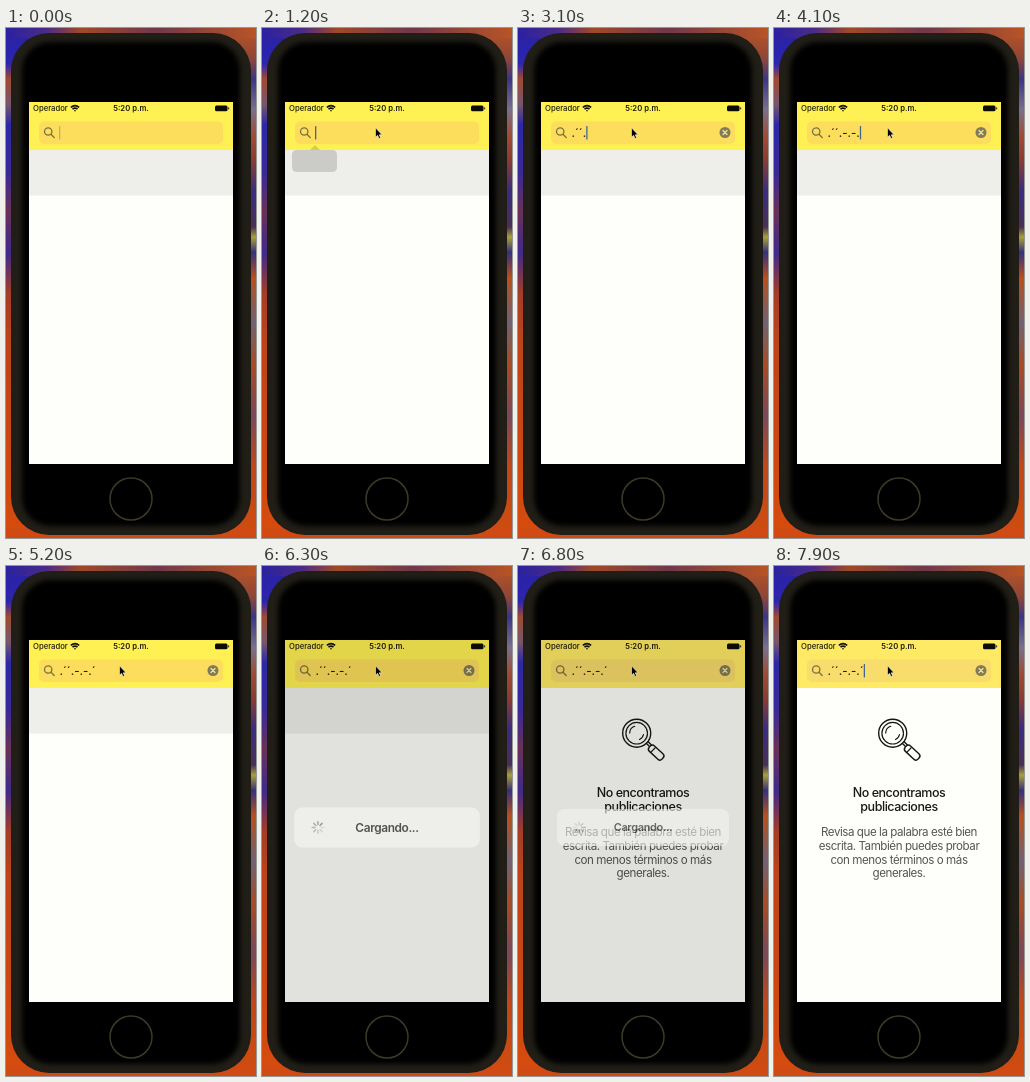
Recreate the animation shown at these times as an HTML page. Size 250 px wide and 510 px high, loop 8000 ms.

```html
<!DOCTYPE html>
<html lang="es">
<head>
<meta charset="utf-8">
<style>
  html, body { margin: 0; width: 100%; height: 100%; overflow: hidden; background: #000; }
  svg { display: block; width: 250px; height: 510px; font-family: Inter, Roboto, sans-serif; }
  .status { font-size: 7.7px; font-weight: 500; fill: #1e1d0c; }
  .title { font-size: 12.5px; font-weight: 500; letter-spacing: -.45px; fill: #181818; }
  .body { font-size: 11.6px; letter-spacing: -.45px; fill: #555; }
  .mid { text-anchor: middle; }
  .line { fill: none; stroke: #151515; stroke-width: 1.4; stroke-linecap: round; stroke-linejoin: round; }
</style>
</head>
<body>
<svg viewBox="0 0 250 510">
  <defs>
    <linearGradient id="left" x1="0" y1="0" x2="0" y2="1">
      <stop offset="0" stop-color="#2a22a0"/><stop offset=".07" stop-color="#2b25b0"/>
      <stop offset=".1" stop-color="#a04a30"/><stop offset=".15" stop-color="#77566c"/>
      <stop offset=".19" stop-color="#2c28a8"/><stop offset=".28" stop-color="#39289a"/>
      <stop offset=".36" stop-color="#6a3158"/><stop offset=".44" stop-color="#40298c"/>
      <stop offset=".52" stop-color="#a43c28"/><stop offset=".6" stop-color="#bc431a"/>
      <stop offset="1" stop-color="#d84c0c"/>
    </linearGradient>
    <linearGradient id="right" x1="0" y1="0" x2="0" y2="1">
      <stop offset="0" stop-color="#b85424"/><stop offset=".06" stop-color="#8e4638"/>
      <stop offset=".1" stop-color="#3c3586"/><stop offset=".16" stop-color="#77718c"/>
      <stop offset=".21" stop-color="#a04c34"/><stop offset=".26" stop-color="#8a3c34"/>
      <stop offset=".32" stop-color="#3a2c80"/><stop offset=".39" stop-color="#493058"/>
      <stop offset=".41" stop-color="#a8a038"/><stop offset=".44" stop-color="#353080"/>
      <stop offset=".49" stop-color="#b8501c"/><stop offset=".58" stop-color="#706274"/>
      <stop offset=".66" stop-color="#a84c24"/><stop offset=".76" stop-color="#7c4858"/>
      <stop offset=".86" stop-color="#c04818"/><stop offset="1" stop-color="#d04c10"/>
    </linearGradient>
    <linearGradient id="top">
      <stop offset="0" stop-color="#2a22a0"/><stop offset=".16" stop-color="#4a2a88"/>
      <stop offset=".3" stop-color="#a04828"/><stop offset=".6" stop-color="#70384c"/>
      <stop offset="1" stop-color="#b85424"/>
    </linearGradient>
    <filter id="soften"><feGaussianBlur stdDeviation="2.500"/></filter>
    <clipPath id="screen"><rect x="23" y="74" width="204" height="362"/></clipPath>
  </defs>

  <rect width="125" height="510" fill="url(#left)"/>
  <rect x="125" width="125" height="510" fill="url(#right)"/>
  <rect width="250" height="10" fill="url(#top)"/>
  <rect y="500" width="250" height="10" fill="#d04a14"/>
  <rect x="5" y="5" width="240" height="502" rx="38" fill="#201e16"/>
  <rect x="16" y="14" width="218" height="484" rx="28" fill="#000" filter="url(#soften)"/>
  <circle cx="125" cy="471" r="21" fill="#000" stroke="#3c3a28" stroke-width="1.500"/>

  <g clip-path="url(#screen)">
    <rect x="23" y="74" width="204" height="362" fill="#fefefa"/>
    <rect id="band" x="23" y="122" width="204" height="45.500" fill="#eeeeea"/>
    <rect id="header" x="23" y="74" width="204" height="48"/>
    <rect id="field" x="33" y="93.500" width="184" height="22.500" rx="5"/>

    <text class="status" x="27" y="83.300">Operador</text>
    <text class="status mid" x="125" y="83.300" style="font-weight:600">5:20 p.m.</text>
    <g fill="none" stroke="#14140c" stroke-width="1.600">
      <path d="M64.800 79.300Q69 75.800 73.200 79.300M66.500 81.200Q69 79.100 71.500 81.200"/>
      <path d="M69 82.200v1.100" stroke-width="1.800"/>
    </g>
    <rect x="209" y="77.400" width="12.500" height="5.800" rx="1.500" fill="#0d0d08"/>
    <rect x="222" y="79.200" width="1.200" height="2.200" rx=".6" fill="#3b3a26"/>

    <g fill="none" stroke="#7c7040" stroke-width="1.300" stroke-linecap="round">
      <circle cx="42.200" cy="103.500" r="3.700"/><path d="M45 106.300l3.200 3.200"/>
    </g>
    <text id="query" x="53.500" y="108.500" font-size="11.500" font-weight="500" fill="#20200f"></text>
    <rect id="caret" y="98" width="1.300" height="13.500" rx=".5" fill="#41688c"/>
    <g id="clear">
      <circle cx="207" cy="104.500" r="5.500" fill="#807b5a"/>
      <path d="M205 102.500l4 4m0-4l-4 4" stroke="#f8e388" stroke-width="1.200" stroke-linecap="round"/>
    </g>
    <path id="menu" fill="#303030" d="M35 122H48L53 117L58 122H70Q75 122 75 127V139Q75 144 70 144H35Q30 144 30 139V127Q30 122 35 122Z"/>

    <g id="empty">
      <g class="line">
        <circle cx="118.700" cy="167.200" r="14"/>
        <circle cx="118.700" cy="167.200" r="10.800" stroke-width="1.200"/>
        <path d="M111.700 167a7 7 0 0 1 5-6.700M125.500 168.500a7 7 0 0 1-4 5" stroke-width="1.200"/>
        <path d="M128.500 177.500l3 3M130.200 175.800l3 3"/>
        <rect x="-1" y="-3.700" width="17.500" height="7.400" rx="3" transform="translate(132.500 181.300) rotate(43)"/>
        <path d="M137 182l-4 4.200" stroke-width="1.200"/>
      </g>
      <g class="title mid">
        <text x="125" y="230.500">No encontramos</text>
        <text x="125" y="245.300">publicaciones</text>
      </g>
      <g class="body mid">
        <text x="125" y="270">Revisa que la palabra esté bien</text>
        <text x="125" y="284">escrita. También puedes probar</text>
        <text x="125" y="297.700">con menos términos o más</text>
        <text x="125" y="311.300">generales.</text>
      </g>
    </g>

    <rect id="shade" x="23" y="74" width="204" height="362"/>
    <g id="alert">
      <rect x="-86" y="-18.500" width="172" height="37" rx="7.500" fill="#f4f4f0"/>
      <g id="spinner" transform="translate(-64 0)" stroke="#666" stroke-width="1.400" stroke-linecap="round"></g>
      <text class="mid" y="3.900" font-size="11" font-weight="600" letter-spacing="-.35" fill="#141414">Cargando...</text>
    </g>
  </g>
  <path id="pointer" d="M113.500 99.800V109.200L115.600 107.300L117 110.500L118.600 109.800L117.200 106.800H120Z" fill="#000" stroke="#f6f3e0" stroke-width=".6"/>
</svg>
<script>
const LOOP = 8000;
const QUERY = ".´´.-.-.´";
const TYPING = { from: 2200, step: 260 };
const TYPED = TYPING.from + TYPING.step * QUERY.length;
const BLINKS = [
  { from: 0, to: TYPING.from, base: 20 },
  { from: TYPED, to: 6150, base: 4600 },
  { from: 6950, to: LOOP, base: 6700 }
];
const $ = id => document.getElementById(id);
const clamp = v => Math.max(0, Math.min(1, v));
const ramp = (t, a, b) => clamp((t - a) / (b - a));
const easeOut = p => 1 - (1 - p) ** 2;
const show = (id, opacity) => $(id).setAttribute("opacity", +opacity);

const spokes = Array.from({ length: 8 }, (_, i) => {
  const spoke = document.createElementNS("http://www.w3.org/2000/svg", "path");
  spoke.setAttribute("d", "M0-2.700V-5.400");
  spoke.setAttribute("transform", `rotate(${i * 45})`);
  return $("spinner").appendChild(spoke);
});

function caretOpacity(t) {
  if (t >= TYPING.from && t < TYPED) return 1;
  const span = BLINKS.find(s => t >= s.from && t < s.to);
  return span ? clamp(.5 + 1.2 * Math.sin((t - span.base) / 1000 * 2 * Math.PI)) : 0;
}

function drawQuery(t) {
  const count = Math.max(0, Math.min(QUERY.length, Math.floor((t - TYPING.from) / TYPING.step) + 1));
  $("query").textContent = QUERY.slice(0, count);
  const width = count ? $("query").getComputedTextLength() + .5 : 0;
  $("caret").setAttribute("x", 53 + width);
  show("caret", caretOpacity(t));
  show("clear", count > 0);
}

function drawAlert(t) {
  const enter = easeOut(ramp(t, 6200, 6500));
  const stay = 1 - ramp(t, 6700, 6950);
  show("shade", .2 * enter * stay);
  show("alert", clamp(enter * 1.25) * stay);
  $("alert").setAttribute("transform", `translate(125 261.500) scale(${1.18 - .18 * enter})`);
  const step = Math.floor(t / 125);
  spokes.forEach((s, i) => s.setAttribute("opacity", .2 + .09 * ((i - step % 8 + 8) % 8)));
}

function draw(t) {
  const loaded = t >= 6500;
  $("header").setAttribute("fill", loaded ? "#ffea66" : "#fff054");
  $("field").setAttribute("fill", loaded ? "#f8dc6c" : "#fddd5c");
  show("band", !loaded);
  show("empty", loaded);
  show("pointer", t >= 700);
  show("menu", .18 * ramp(t, 1050, 1180) * (1 - ramp(t, 1220, 1400)));
  drawQuery(t);
  drawAlert(t);
}

const start = performance.now();
function tick() {
  draw((performance.now() - start) % LOOP);
  requestAnimationFrame(tick);
}
tick();
</script>
</body>
</html>
```
